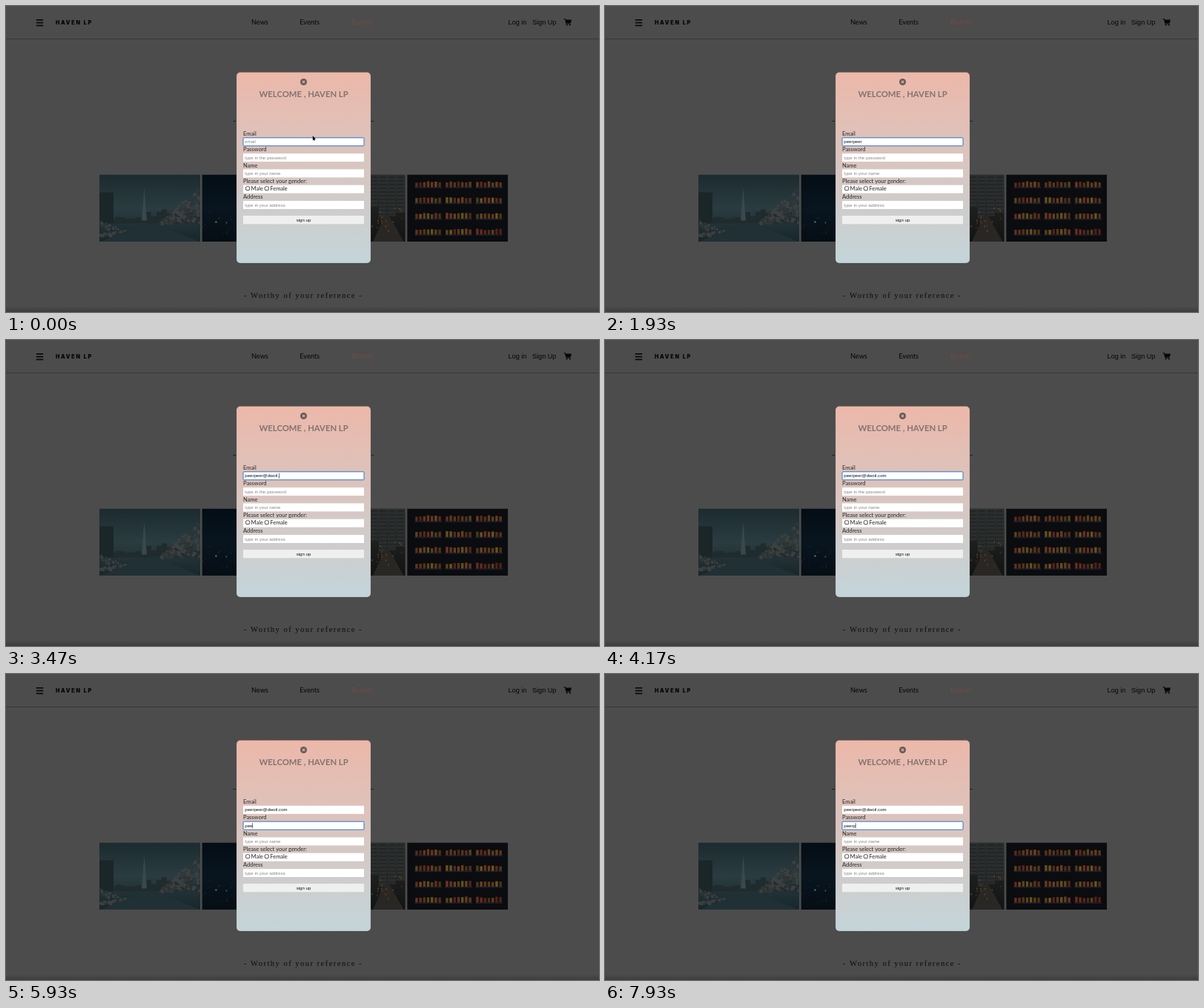
Write an HTML page with a canvas that moves like this. It is 800 px wide and 413 px high and loops after 8 s.

```html
<!DOCTYPE html>
<html lang="en">
<head>
<meta charset="utf-8">
<title>Sign up form</title>
<style>
  html, body { margin: 0; width: 100%; height: 100%; overflow: hidden; background: #4c4c4c; }
  canvas { display: block; width: 800px; height: 413px; }
</style>
</head>
<body>
<canvas id="stage"></canvas>
<script>
const W = 800, H = 413, LOOP = 8000;
const SANS = 'Lato, sans-serif';
const UI = '6.06px "Liberation Sans", Arial, sans-serif';
const BRAND = 'HAVEN LP';
const EMAIL = 'peerpeer@dwoil.com';
const PASSWORD = 'peerper';
const FIELD = { x: 320, y: 177.8, w: 163, h: 11, pitch: 21.3 };
const FOCUS_SWITCH = 4580;
const scale = Math.max(1, window.devicePixelRatio || 1);

// Bursts of even key presses: start, end, first length, last length
const emailBursts = [
  [120, 120, 0, 0], [580, 820, 1, 4], [1170, 1170, 6, 6], [1350, 1470, 7, 8],
  [2050, 2050, 9, 9], [2750, 2870, 10, 12], [3120, 3230, 13, 14],
  [3470, 3580, 15, 16], [3820, 3870, 17, 18]
];
const passwordBursts = [
  [FOCUS_SWITCH, FOCUS_SWITCH, 0, 0], [5690, 6050, 1, 4], [6350, 6520, 5, 7],
  [7000, 7470, 6, 4], [7930, 7930, 5, 5]
];
const caretHides = [0, 1930, 2280, 4170, 5470, 7700];

function makeCanvas(el) {
  el.width = W * scale;
  el.height = H * scale;
  const c = el.getContext('2d');
  c.scale(scale, scale);
  return c;
}

const view = makeCanvas(document.getElementById('stage'));
const backdrop = document.createElement('canvas');
let g = makeCanvas(backdrop);

function rect(x, y, w, h, fill) {
  g.fillStyle = fill;
  g.fillRect(x, y, w, h);
}

function poly(points, fill) {
  g.fillStyle = fill;
  g.beginPath();
  points.forEach(([x, y]) => g.lineTo(x, y));
  g.fill();
}

function disc(x, y, r, fill) {
  g.fillStyle = fill;
  g.beginPath();
  g.arc(x, y, r, 0, 7);
  g.fill();
}

function line(x0, y0, x1, y1, color, width) {
  g.strokeStyle = color;
  g.lineWidth = width;
  g.beginPath();
  g.moveTo(x0, y0);
  g.lineTo(x1, y1);
  g.stroke();
}

function fade(y0, y1, ...colors) {
  const grad = g.createLinearGradient(0, y0, 0, y1);
  colors.forEach((c, i) => grad.addColorStop(i / (colors.length - 1), c));
  return grad;
}

function text(str, x, y, font, color, align = 'left', spacing = 0) {
  g.font = font;
  g.fillStyle = color;
  g.textAlign = align;
  g.letterSpacing = spacing + 'px';
  g.fillText(str, x, y);
  g.letterSpacing = '0px';
}

function seeded(seed) {
  return () => (seed = (seed * 16807) % 2147483647) / 2147483647;
}

function photo(index, paint) {
  g.save();
  g.translate(126 + index * 138.4, 227.5);
  g.beginPath();
  g.rect(0, 0, 136, 90.5);
  g.clip();
  paint(seeded(41 + index * 17));
  g.restore();
}

function riverPhoto(rnd) {
  rect(0, 0, 136, 91, fade(0, 91, '#1b2b30', '#2b3c41', '#17262a'));
  for (let x = 0; x < 136; x += 7) {
    const top = 46 + rnd() * 14;
    rect(x, top, 7, 66 - top, '#202b2e');
  }
  rect(0, 24, 19, 42, '#1b2629');
  poly([[57, 62], [60.5, 18], [64, 62]], '#3b474a');
  // Blossom along both banks, taller toward the right edge
  for (let i = 0; i < 260; i++) {
    const d = rnd() * 54, near = 1 - d / 54, right = i % 3;
    const x = right ? 136 - d : d;
    const y = right ? 66 - rnd() * 50 * near : 84 - rnd() * 22 * near;
    disc(x, y, 1 + rnd() * 1.6, i % 2 ? '#3c4040' : '#2e3434');
  }
  poly([[0, 91], [62, 66], [76, 66], [136, 91]], '#203035');
}

function nightPhoto(rnd) {
  rect(0, 0, 136, 91, fade(0, 91, '#040d15', '#08151f', '#060d14'));
  for (let i = 0; i < 24; i++) {
    rect(rnd() * 47, 50 + rnd() * 32, 1 + rnd(), 0.7, i % 4 ? '#1b2931' : '#453b32');
  }
  disc(19, 64, 1.2, '#606768');
  disc(33, 65, 0.9, '#535d60');
}

function streetPhoto(rnd) {
  rect(0, 0, 136, 91, fade(0, 91, '#2b2f2f', '#1d1f1f', '#121414'));
  for (let x = 88; x < 136; x += 12) {
    const bottom = 44 + rnd() * 18;
    rect(x, 0, 11, bottom, x % 24 ? '#2b2e2d' : '#222627');
    for (let y = 3; y < bottom; y += 5) rect(x + 1, y, 9, 1, '#191d1e');
  }
  poly([[92, 91], [109, 54], [113, 54], [134, 91]], '#292724');
  for (let i = 0; i < 20; i++) {
    rect(90 + rnd() * 42, 44 + rnd() * 34, 1.5, 2, i % 3 ? '#65451f' : '#4a2921');
  }
}

function shelfPhoto(rnd) {
  rect(0, 0, 136, 91, '#0a0c10');
  for (let row = 0; row < 4; row++) {
    const base = 17 + row * 21.3;
    for (let col = 0; col < 3; col++) {
      const x = 10 + col * 41;
      rect(x, base, 37, 1.4, '#182130');
      for (let i = 0; i < 7; i++) {
        const h = 6 + rnd() * 2, hue = 10 + rnd() * 34;
        rect(x + 1 + i * 5.2, base - h, 3.4, h, `hsl(${hue} 58% ${19 + rnd() * 9}%)`);
      }
    }
  }
}

function header() {
  const ink = '#060606';
  for (let i = 0; i < 3; i++) rect(40.8, 18 + i * 3.8, 9.4, 1.6, ink);
  text(BRAND, 67, 24.6, '900 7.2px Inter, sans-serif', ink, 'left', 1.7);
  const nav = `9.2px ${SANS}`;
  text('News', 331, 25, nav, ink);
  text('Events', 396.2, 25, nav, ink);
  text('Boards', 466, 25, nav, '#704b45');
  const links = '9.1px "Liberation Sans", Arial, sans-serif';
  text('Log in', 677.6, 25, links, ink);
  text('Sign Up', 710, 25, links, ink);
  line(752.6, 17.7, 754.7, 17.7, ink, 1.1);
  line(754.5, 17.7, 756, 24, ink, 1.1);
  line(756, 24, 761.6, 24, ink, 1.1);
  poly([[754.6, 18.6], [763, 18.6], [761.8, 22.9], [755.5, 22.9]], ink);
  disc(756.6, 25.6, 1, ink);
  disc(760.9, 25.6, 1, ink);
  rect(0, 44, W, 0.7, '#303030');
}

function modal() {
  g.beginPath();
  g.roundRect(311, 89.5, 181, 257.5, 5);
  g.fillStyle = fade(89, 347, '#ecb8a9', '#d8c6c1', '#c3d5da');
  g.fill();
  g.strokeStyle = 'rgba(110,105,105,.35)';
  g.lineWidth = 0.6;
  g.stroke();

  disc(401.5, 102.5, 4.5, '#665b58');
  line(399.9, 100.9, 403.1, 104.1, '#eab9ab', 1.2);
  line(399.9, 104.1, 403.1, 100.9, '#eab9ab', 1.2);
  text('WELCOME , ' + BRAND, 401.6, 122.6, `bold 11.3px ${SANS}`, '#83736f', 'center');

  const label = `7.5px ${SANS}`;
  ['Email', 'Password', 'Name', 'Please select your gender:', 'Address'].forEach((name, i) => {
    const y = FIELD.y + i * FIELD.pitch;
    text(name, FIELD.x, y - 2.8, label, '#292524');
    rect(FIELD.x, y, FIELD.w, FIELD.h, '#fff');
  });
  for (const [name, x] of [['Male', 326.1], ['Female', 351.8]]) {
    g.beginPath();
    g.arc(x, 246.2, 2.7, 0, 7);
    g.strokeStyle = '#777';
    g.stroke();
    text(name, x + 4.5, 249, label, '#222');
  }
  hint('type in your name', 2);
  hint('type in your address', 4);
  rect(FIELD.x, 283, FIELD.w, 11.3, '#efefef');
  text('sign up', 401.5, 290.7, UI, '#111', 'center');
}

function fieldText(str, row, color) {
  text(str, FIELD.x + 2.3, FIELD.y + row * FIELD.pitch + 7.6, UI, color);
}

function hint(str, row) {
  fieldText(str, row, '#858585');
}

function paintBackdrop() {
  rect(0, 0, W, H, '#4c4c4c');
  header();
  for (const x of [306.4, 492.4]) rect(x, 155, 3.6, 0.9, '#181818');
  [riverPhoto, nightPhoto, streetPhoto, shelfPhoto].forEach((paint, i) => photo(i, paint));
  text('- Worthy of your reference -', 321, 394,
    '10.6px "Liberation Serif", "Times New Roman", serif', '#0c0c0c', 'left', 1.45);
  rect(0, 405, W, 8, fade(405, 413, 'rgba(45,35,35,0)', 'rgba(45,35,35,.4)'));
  modal();
}

// Length typed so far and the time of the latest key press
function typing(bursts, t) {
  const burst = bursts.findLast(b => b[0] <= t);
  if (!burst) return { count: 0, at: 0 };
  const [start, end, first, last] = burst;
  const steps = Math.abs(last - first);
  const gap = steps ? (end - start) / steps : 0;
  const done = steps ? Math.min(steps, Math.floor((t - start) / gap + 1e-6)) : 0;
  return { count: first + Math.sign(last - first) * done, at: start + done * gap };
}

function field(value, placeholder, bursts, t, row, focused) {
  const { count, at } = typing(bursts, t);
  const typed = value.slice(0, count);
  if (count) fieldText(typed, row, '#111');
  else hint(placeholder, row);
  if (!focused) return;

  const y = FIELD.y + row * FIELD.pitch;
  g.beginPath();
  g.roundRect(FIELD.x, y, FIELD.w, FIELD.h, 1);
  g.strokeStyle = '#2f74c6';
  g.lineWidth = 1;
  g.stroke();
  const hiddenAt = caretHides.findLast(h => h <= t);
  if (at > hiddenAt) {
    rect(FIELD.x + 2.3 + g.measureText(typed).width, y + 2, 0.6, 7, '#111');
  }
}

function pointer(t) {
  if (t < 120) {
    poly([[413.8, 175], [413.8, 181.2], [417.8, 179.7]], '#0a0a0a');
    line(415.2, 179.5, 416.3, 181.8, '#0a0a0a', 1);
  } else if (t < 400) {
    line(414.6, 174.8, 414.6, 181.6, '#222', 0.7);
    for (const y of [174.6, 181.8]) line(413.4, y, 415.8, y, '#222', 0.6);
  }
}

function render(t) {
  g.drawImage(backdrop, 0, 0, W, H);
  const onPassword = t >= FOCUS_SWITCH;
  field(EMAIL, 'email', emailBursts, t, 0, !onPassword);
  field(PASSWORD, 'type in the password', passwordBursts, t, 1, onPassword);
  pointer(t);
}

paintBackdrop();
g = view;
const start = performance.now();
function tick() {
  render((performance.now() - start) % LOOP);
  requestAnimationFrame(tick);
}
tick();
</script>
</body>
</html>
```
